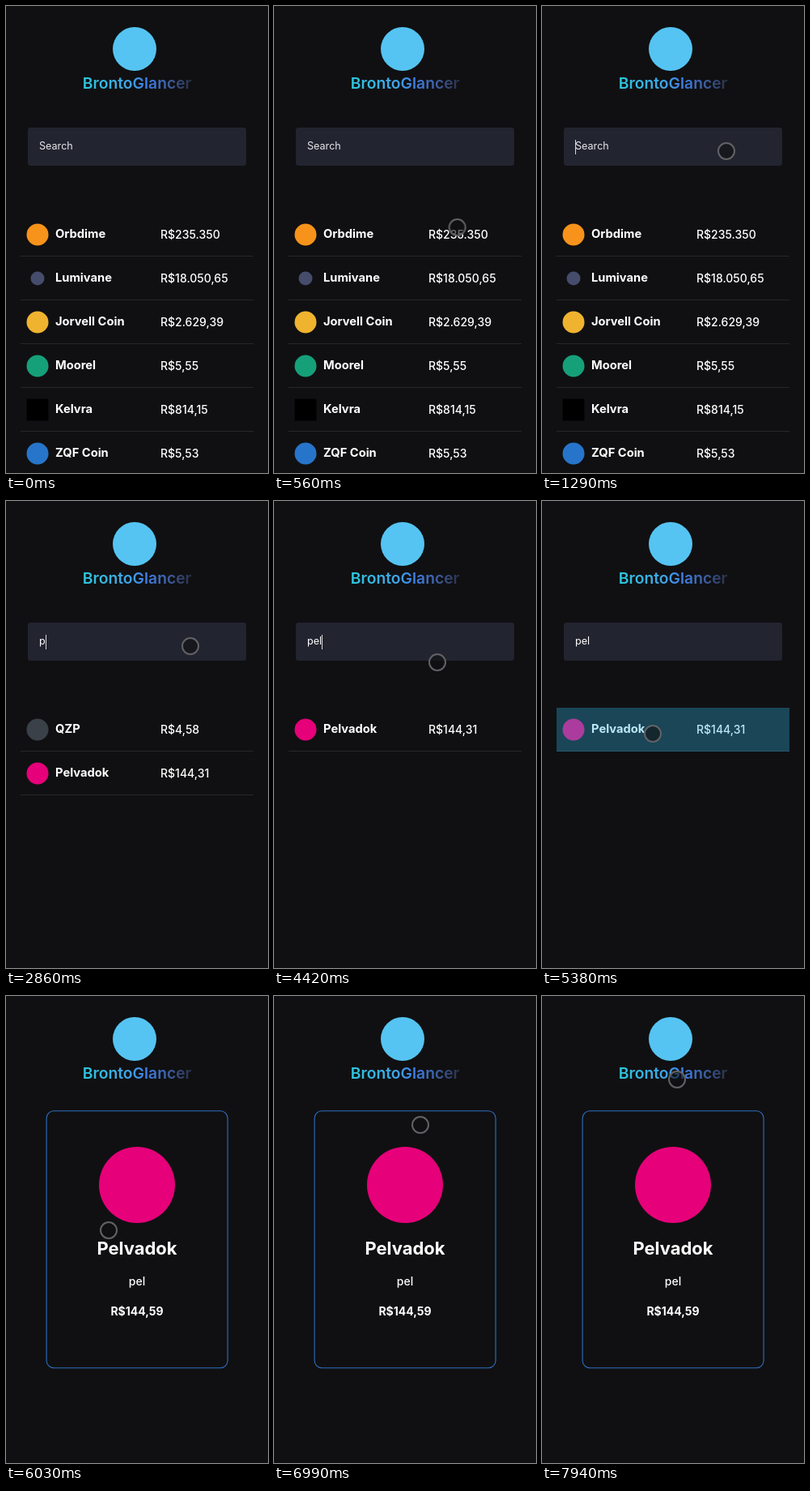
Animation, 324 px wide and 576 px high, one loop 8000 ms. Source, as an HTML page:

```html
<!DOCTYPE html>
<html lang="en">
<head>
<meta charset="utf-8">
<title>BrontoGlancer</title>
<style>
  html, body { margin: 0; width: 100%; height: 100%; overflow: hidden; background: #101012; }
  body { position: relative; color: #fff; font: 500 14px Inter, sans-serif; }
  body * { box-sizing: border-box; }

  .logo { position: absolute; left: 132px; top: 26px; width: 54px; height: 54px; border-radius: 50%; background: #55c4f2; }
  .brand { position: absolute; left: 162px; top: 82px; transform: translateX(-50%); font-size: 19.3px; font-weight: 600; line-height: 26px; color: transparent;
    background: linear-gradient(90deg, #2cc6dd, #3fa5e8 42%, #3f80e6 58%, #3c5a9a 82%, #2b3048); -webkit-background-clip: text; background-clip: text; }

  .search { position: absolute; left: 27px; top: 150px; width: 270px; height: 47px; border-radius: 3px; background: #222430; font-size: 12.6px; font-weight: 400; line-height: 46px; }
  .search div { position: absolute; left: 14px; top: 0; white-space: nowrap; }
  .placeholder { color: #e6e6ea; }
  .caret { display: inline-block; width: 1px; height: 18px; margin-right: -1px; background: #d8d8dc; vertical-align: middle; }

  .list { position: absolute; left: 18px; top: 255px; width: 288px; }
  .row { position: relative; height: 54px; line-height: 53px; border-bottom: 1px solid #27282b; }
  .row i { position: absolute; left: 20.5px; top: 26.5px; width: var(--d, 27px); height: var(--d, 27px); transform: translate(-50%, -50%); border-radius: var(--r, 50%); background: var(--c); }
  .row b { position: absolute; left: 43px; font-size: 14.7px; font-weight: 700; }
  .row span { position: absolute; left: 173px; }
  .tap { position: absolute; inset: 0 0 auto; height: 54px; background: rgba(51, 181, 229, .33); }

  .card { position: absolute; inset: 0; text-align: center; }
  .card > * { position: absolute; left: 0; width: 324px; margin: 0; line-height: 30px; }
  .card svg { top: 0; height: 576px; }
  .card h1 { top: 296px; font-size: 22px; font-weight: 700; }
  .card p { top: 337px; }
  .card b { top: 374px; font-weight: 700; }

  .pointer { position: absolute; left: -11px; top: -11px; width: 22px; height: 22px; border: 2.5px solid #626266; border-radius: 50%; background: rgba(17, 17, 19, .6); }

  /* Timeline: 1% = 80 ms */
  .all, .pair, .single, .tap, .search, .card, .placeholder, .one, .two, .three,
  .placeholder .caret, .three .caret { animation: 8s step-end infinite; }
  .all, .placeholder { animation-name: all; }
  .pair, .one { animation-name: first-letter; }
  .single { animation-name: single; }
  .two { animation-name: second-letter; }
  .three { animation-name: third-letter; }
  .placeholder .caret { animation-name: focus; }
  .three .caret { animation-name: blur; }
  .tap { animation-name: tap; }
  .search { animation-name: search; }
  .card { animation-name: card; }
  .pointer { animation: move 8s step-end infinite, pointer 8s step-end infinite; }

  @keyframes all { 0% { opacity: 1 } 35.75%, 100% { opacity: 0 } }
  @keyframes first-letter { 0% { opacity: 0 } 35.75% { opacity: 1 } 38.75%, 100% { opacity: 0 } }
  @keyframes second-letter { 0% { opacity: 0 } 38.75% { opacity: 1 } 41.875%, 100% { opacity: 0 } }
  @keyframes third-letter { 0% { opacity: 0 } 41.875%, 100% { opacity: 1 } }
  @keyframes single { 0% { opacity: 0 } 38.75% { opacity: 1 } 75.375%, 100% { opacity: 0 } }
  @keyframes focus { 0% { opacity: 0 } 12%, 100% { opacity: 1 } }
  @keyframes blur { 0% { opacity: 1 } 66.25%, 100% { opacity: 0 } }
  @keyframes tap { 0% { opacity: 0 } 66.25% { opacity: 1 } 69.25%, 100% { opacity: 0 } }
  @keyframes search { 0% { opacity: 1 } 75.375%, 100% { opacity: 0 } }
  @keyframes card { 0% { opacity: 0 } 75.375%, 100% { opacity: 1 } }
  @keyframes pointer { 0% { opacity: 0 } 1% { opacity: 1 } 42.875% { opacity: 0 } 55.25%, 100% { opacity: 1 } }
  @keyframes move {
    0% { transform: translate(302px, 556px) }
    1% { transform: translate(302px, 556px); animation-timing-function: steps(4) }
    5% { transform: translate(240px, 330px); animation-timing-function: steps(6) }
    11% { transform: translate(200px, 159px) }
    15.125% { transform: translate(214px, 169px) }
    16.125% { transform: translate(228px, 179px) }
    55.25% { transform: translate(202px, 199px); animation-timing-function: steps(5) }
    60.25% { transform: translate(140px, 295px) }
    61.25% { transform: translate(137px, 289px) }
    64.25% { transform: translate(137px, 287px) }
    73.375% { transform: translate(161px, 271px) }
    75.375% { transform: translate(127px, 289px); animation-timing-function: steps(10) }
    85.375% { transform: translate(172px, 185px); animation-timing-function: steps(2) }
    87.375% { transform: translate(181px, 159px); animation-timing-function: steps(4) }
    91.375% { transform: translate(180px, 80px); animation-timing-function: steps(5) }
    96.25% { transform: translate(80px, 18px) }
    98.25% { transform: translate(124px, 60px) }
    99.25%, 100% { transform: translate(167px, 103px) }
  }
</style>
</head>
<body>
  <div class="logo"></div>
  <div class="brand">BrontoGlancer</div>

  <div class="search">
    <div class="placeholder"><span class="caret"></span>Search</div>
    <div class="one">p<span class="caret"></span></div>
    <div class="two">pe<span class="caret"></span></div>
    <div class="three">pel<span class="caret"></span></div>
  </div>

  <div class="list all">
    <div class="row" style="--c:#f7931a"><i></i><b>Orbdime</b><span>R$235.350</span></div>
    <div class="row" style="--c:#454c6c;--d:17px"><i></i><b>Lumivane</b><span>R$18.050,65</span></div>
    <div class="row" style="--c:#f0b32f"><i></i><b>Jorvell Coin</b><span>R$2.629,39</span></div>
    <div class="row" style="--c:#16a07a"><i></i><b>Moorel</b><span>R$5,55</span></div>
    <div class="row" style="--c:#000;--r:0"><i></i><b>Kelvra</b><span>R$814,15</span></div>
    <div class="row" style="--c:#2775ca"><i></i><b>ZQF Coin</b><span>R$5,53</span></div>
  </div>
  <div class="list pair">
    <div class="row" style="--c:#3a4148"><i></i><b>QZP</b><span>R$4,58</span></div>
    <div class="row" style="--c:#e6007a"><i></i><b>Pelvadok</b><span>R$144,31</span></div>
  </div>
  <div class="list single">
    <div class="row" style="--c:#e6007a"><i></i><b>Pelvadok</b><span>R$144,31</span></div>
    <div class="tap"></div>
  </div>

  <div class="card">
    <svg viewBox="0 0 324 576">
      <rect x="50.1" y="141.8" width="224" height="317" rx="9" fill="none" stroke="#2f6fc0" stroke-width="1.1"/>
      <circle cx="162" cy="233" r="47" fill="#e6007a"/>
    </svg>
    <h1>Pelvadok</h1>
    <p>pel</p>
    <b>R$144,59</b>
  </div>

  <div class="pointer"></div>
</body>
</html>
```
